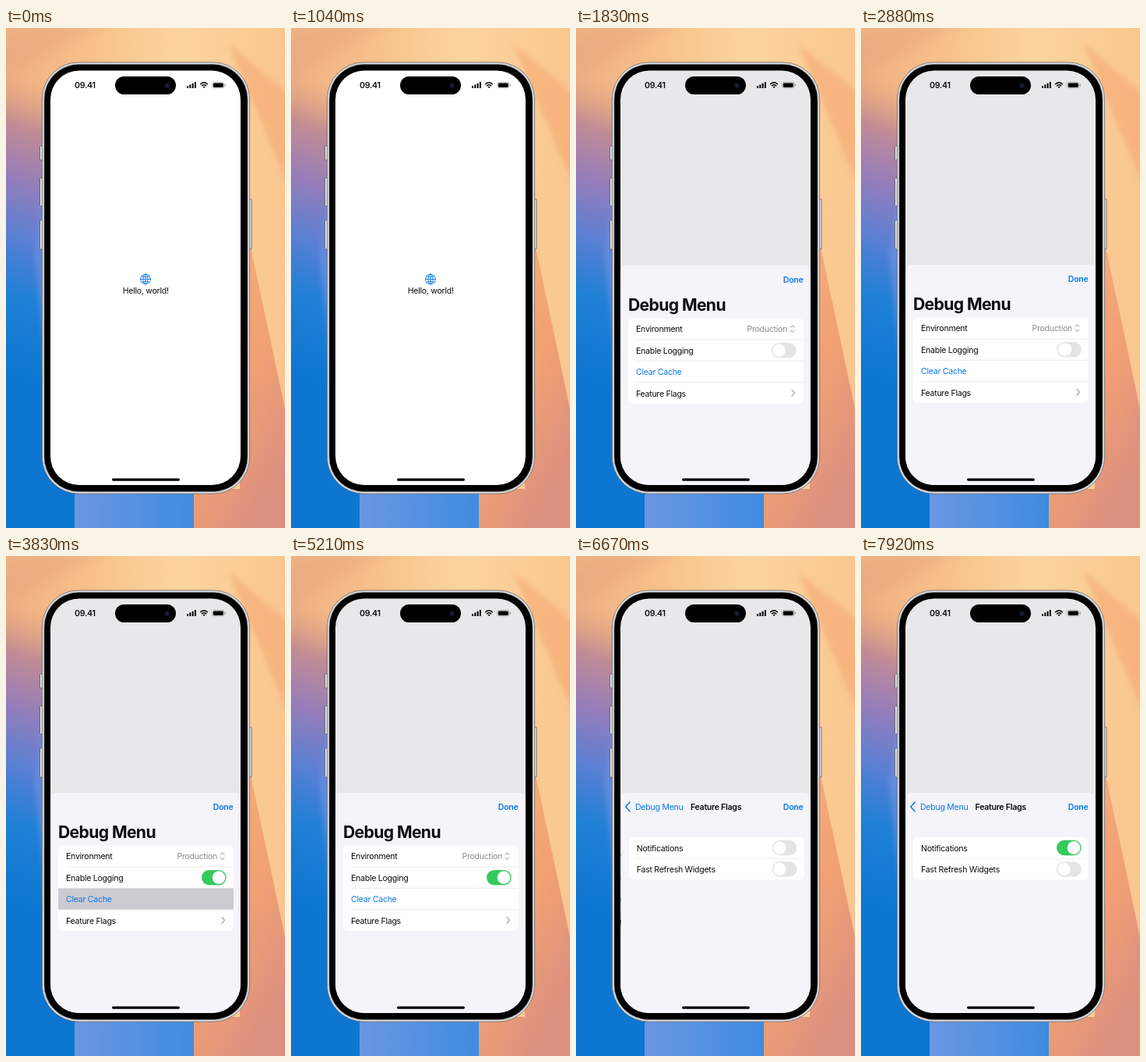
An HTML page that plays this animation: 358 px wide and 640 px high, repeating every 8 s.

```html
<!DOCTYPE html>
<html lang="en">
<head>
<meta charset="utf-8">
<title>Debug menu</title>
<style>
  html, body { margin: 0; width: 100%; height: 100%; overflow: hidden; }
  svg { display: block; width: 100%; height: 100%; }
  text { font: 10.55px Inter, sans-serif; letter-spacing: -.025em; fill: #0b0b0c; }
  .semi { font-weight: 600; }
  .large { font-size: 21.1px; font-weight: 700; letter-spacing: -.029em; }
  .blue { fill: #0c79e6; }
  .gray { fill: #8a8a8e; }
  .line { fill: none; stroke-linecap: round; stroke-linejoin: round; }
</style>
</head>
<body>
<svg viewBox="0 0 358 640">
  <defs>
    <linearGradient id="warm">
      <stop offset="0" stop-color="#efb184"/><stop offset=".3" stop-color="#f8c08a"/>
      <stop offset=".62" stop-color="#fbd59d"/><stop offset="1" stop-color="#fac68f"/>
    </linearGradient>
    <linearGradient id="cool" gradientUnits="userSpaceOnUse" x1="70" y1="75" x2="-50" y2="430">
      <stop offset="0" stop-color="#e3a27c" stop-opacity="0"/><stop offset=".17" stop-color="#c28c94"/>
      <stop offset=".35" stop-color="#957dbb"/><stop offset=".53" stop-color="#5c7fd3"/>
      <stop offset=".72" stop-color="#2080d6"/><stop offset="1" stop-color="#0c76d0"/>
    </linearGradient>
    <linearGradient id="haze">
      <stop offset="0" stop-color="#6a96e2"/><stop offset="1" stop-color="#3f8ce0"/>
    </linearGradient>
    <linearGradient id="ember" x2=".5" y2="1">
      <stop offset="0" stop-color="#f8b580"/><stop offset=".6" stop-color="#f2a272"/>
      <stop offset="1" stop-color="#dc9080"/>
    </linearGradient>
    <filter id="soft"><feGaussianBlur stdDeviation="3"/></filter>
    <filter id="hazy" x="-50%" width="200%"><feGaussianBlur stdDeviation="9"/></filter>
    <clipPath id="screen"><rect x="57" y="54.5" width="244" height="530.5" rx="37"/></clipPath>
    <clipPath id="sheetShape"><rect x="57" y="303" width="244" height="330" rx="7"/></clipPath>
    <clipPath id="titleArea"><rect x="57" y="303" width="193.5" height="40"/></clipPath>
  </defs>

  <!-- wallpaper -->
  <rect width="358" height="640" fill="url(#warm)"/>
  <path d="M-20 75L150-20H70L-20 25Z" fill="#e2a27c" opacity=".4" filter="url(#hazy)"/>
  <path d="M285 20L370 90V220Z" fill="#f6a873" opacity=".6" filter="url(#soft)"/>
  <path d="M300 215L365 520V660H241V590H300Z" fill="url(#ember)"/>
  <path d="M0 60H90V590H241V640H0Z" fill="url(#cool)"/>
  <path d="M50 190L36 290L66 570H90V190Z" fill="#6f93e2" opacity=".6" filter="url(#soft)"/>
  <path d="M88 560H241V640H88Z" fill="url(#haze)"/>

  <!-- phone -->
  <g fill="#e4e4e7" stroke="#55555a" stroke-width=".8">
    <rect x="43.5" y="151" width="5" height="18" rx="1"/>
    <rect x="43.5" y="192" width="5" height="36" rx="1"/>
    <rect x="43.5" y="246" width="5" height="37" rx="1"/>
    <rect x="310" y="219" width="5" height="64" rx="1"/>
  </g>
  <rect x="46.4" y="43.9" width="266.2" height="552.2" rx="47" fill="#dcdcdf" stroke="#6a6a6e" stroke-width=".8"/>
  <rect x="49" y="46.5" width="261" height="547" rx="44.5" stroke="#77777b" stroke-width=".6"/>

  <g clip-path="url(#screen)">
    <rect x="57" y="54" width="244" height="532" fill="#fff"/>
    <g class="line" stroke="#0c79e6" stroke-width=".9">
      <circle cx="179" cy="321.5" r="6.4"/><ellipse cx="179" cy="321.5" rx="3.1" ry="6.4"/>
      <path d="M179 315.1v12.8M172.6 321.5h12.8M174 317.8q5 2 10 0M174 325.2q5-2 10 0"/>
    </g>
    <text x="179.2" y="340" text-anchor="middle">Hello, world!</text>
    <rect id="dim" x="57" y="54" width="244" height="532" fill="#23142d"/>

    <g id="sheet"><g clip-path="url(#sheetShape)">
      <g id="menuPage"></g>
      <g id="flagsPage"></g>
      <g id="bigTitle"><text class="large" y="8.2">Debug Menu</text></g>
      <g id="backTitle"><text class="blue" y="4.2">Debug Menu</text></g>
      <path id="chevron" class="line" d="M69 315.2L63.8 321L69 326.8" stroke="#0c79e6" stroke-width="1.6"/>
      <g clip-path="url(#titleArea)"><text id="flagsTitle" class="semi" x="179.2" y="325.2" text-anchor="middle">Feature Flags</text></g>
      <text class="semi blue" x="291.5" y="325.2" text-anchor="end">Done</text>
    </g></g>

    <!-- status bar -->
    <text class="semi" x="88" y="77.3">09.41</text>
    <path d="M232 74.2h2v2.8h-2zM235.3 72.6h2v4.4h-2zM238.6 70.8h2v6.2h-2zM241.9 69h2v8h-2z"/>
    <path class="line" stroke="#000" stroke-width="1.5" d="M249.6 71.7q4.4-3.8 8.8 0M251.5 73.9q2.6-2.1 5.2 0"/>
    <path d="M252.6 75.4q1.5-1.1 3 0l-1.5 1.7z"/>
    <rect x="264.7" y="69.4" width="15.2" height="7.6" rx="2.3" fill="none" stroke="#000" stroke-opacity=".35" stroke-width=".7"/>
    <rect x="265.8" y="70.5" width="13" height="5.4" rx="1.4"/>
    <rect x="280.7" y="71.9" width="1" height="2.6" rx=".5" opacity=".5"/>
    <rect x="140" y="62" width="78" height="23" rx="11.5"/>
    <circle cx="206.5" cy="73.5" r="3.6" fill="#10131f"/><circle cx="206.5" cy="73.5" r="1.5" fill="#1b2850"/>
    <rect x="136" y="576.5" width="87" height="3.2" rx="1.6"/>
  </g>
</svg>

<script>
const LOOP = 8000, ROW = 27.4;
const $ = id => document.getElementById(id);
const clamp = v => Math.min(1, Math.max(0, v));
const lerp = (a, b, p) => a + (b - a) * p;
const smooth = v => (v = clamp(v)) * v * (3 - 2 * v);

// Critically damped spring, ms in, 0..1 out
function spring(ms) {
  const x = Math.max(0, ms) * 0.01826;
  return 1 - (1 + x) * Math.exp(-x);
}

const toggle = (id, y) => `<g id="${id}" transform="translate(251 ${y - 9.65})">
  <rect width="31.7" height="19.3" rx="9.65" fill="#e4e4e7"/>
  <rect class="on" width="31.7" height="19.3" rx="9.65" fill="#36c95b"/>
  <rect class="knob" y="1.25" height="16.8" rx="8.4" fill="#fff" stroke="#000" stroke-opacity=".08" stroke-width=".5"/></g>`;

const highlight = (id, y) =>
  `<rect id="${id}" x="67" y="${y}" width="225" height="${ROW}" fill="#cccbd1"/>`;

function card(top, labels, under = "") {
  const rows = labels.map((label, i) => {
    const y = top + ROW * i;
    const rule = i ? `<path d="M77 ${y}H292" stroke="#dedee3" stroke-width=".6"/>` : "";
    const style = label === "Clear Cache" ? "blue" : "";
    return `${rule}<text class="${style}" x="77" y="${y + ROW / 2 + 4.2}">${label}</text>`;
  });
  return `<rect x="57" y="303" width="244" height="330" fill="#f4f4f9"/>
    <rect x="67" y="${top}" width="225" height="${ROW * labels.length}" rx="6.2" fill="#fff"/>${under}${rows.join("")}`;
}

$("menuPage").innerHTML =
  card(370.5, ["Environment", "Enable Logging", "Clear Cache", "Feature Flags"],
    highlight("cachePress", 370.5 + 2 * ROW) + highlight("flagsPress", 370.5 + 3 * ROW)) +
  `<text class="gray" x="271" y="388.4" text-anchor="end">Production</text>
   <path class="line" stroke="#8a8a8e" d="M275.2 382.3l2.4-2.5l2.4 2.5M275.2 386.1l2.4 2.5l2.4-2.5"/>
   <path class="line" stroke="#9b9ba0" stroke-width="1.1" d="M277 462.4l3.6 3.8l-3.6 3.8"/>` +
  toggle("logging", 411.6) +
  `<rect id="pageDim" x="57" y="303" width="330" height="330"/>`;

$("flagsPage").innerHTML =
  card(359.8, ["Notifications", "Fast Refresh Widgets"]) +
  toggle("notifications", 373.5) + toggle("refresh", 400.9);

const move = (id, x, y, scale = 1) =>
  $(id).setAttribute("transform", `translate(${x} ${y}) scale(${scale})`);
const fade = (id, opacity) => $(id).setAttribute("opacity", opacity);

// The knob widens while pressed, then slides across
function setToggle(id, ms) {
  const on = smooth((ms - 110) / 300);
  const extra = 3.7 * (smooth(ms / 110) - smooth((ms - 220) / 260));
  const knob = $(id).querySelector(".knob");
  knob.setAttribute("width", 16.8 + extra);
  knob.setAttribute("x", lerp(1.25, 13.65 - extra, on));
  $(id).querySelector(".on").setAttribute("opacity", on);
}

function draw(t) {
  const rise = t < 1460 ? 0 : spring(t - 1400);
  move("sheet", 0, 283 * (1 - rise));
  fade("dim", 0.1 * clamp(rise * 2));

  setToggle("logging", t - 2830);
  fade("cachePress", t < 3830 ? 0 : 1 - smooth((t - 3950) / 680));
  fade("flagsPress", t < 6170 ? 0 : 1);

  const push = spring(t - 6235);
  move("menuPage", -73 * push, 0);
  fade("pageDim", 0.1 * push);
  move("flagsPage", 244 * (1 - push), 0);

  // Large title shrinks into the back button
  const x = lerp(67, 76, push), y = lerp(353, 321, push), width = lerp(124, 61, push);
  move("bigTitle", x, y, width / 124);
  move("backTitle", x, y, width / 61);
  fade("bigTitle", 1 - push);
  fade("backTitle", push);
  fade("chevron", clamp(push * 2 - 1));
  move("flagsTitle", 122 * (1 - push), 0);
  fade("flagsTitle", push * push);

  setToggle("notifications", t - 7330);
  setToggle("refresh", -1);
}

function tick() {
  draw(performance.now() % LOOP);
  requestAnimationFrame(tick);
}
tick();
</script>
</body>
</html>
```
